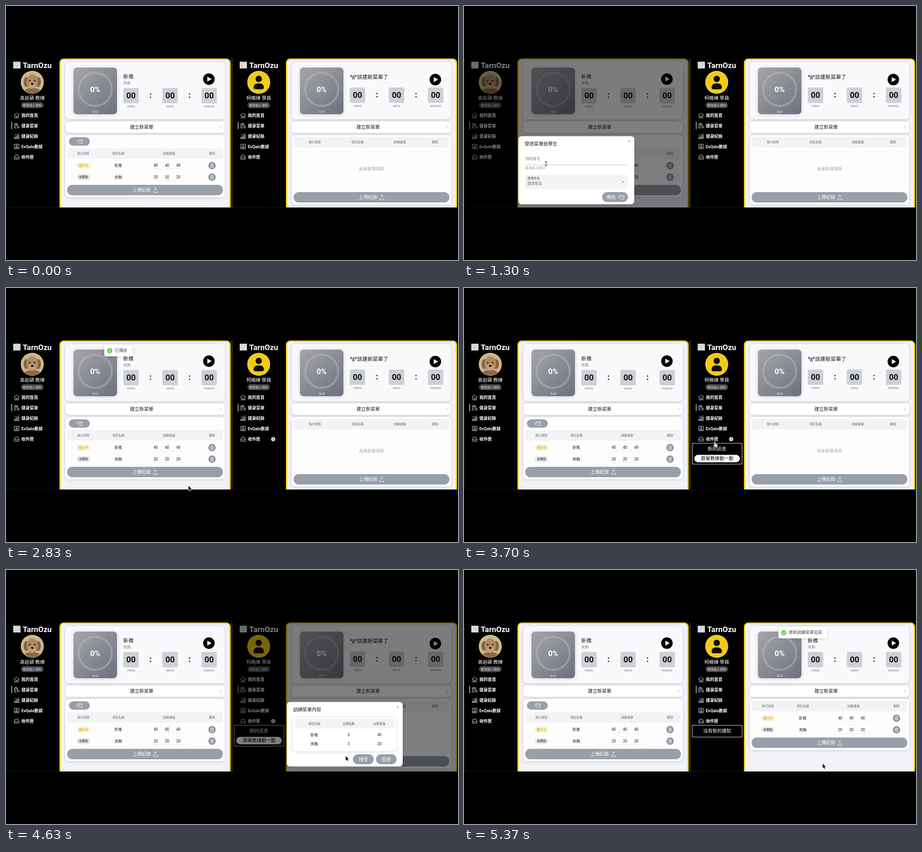
Animation, 998 px wide and 561 px high, one loop 5.41 s. Source, as an HTML page with a canvas:

```html
<!DOCTYPE html>
<html lang="zh-Hant">
<head>
<meta charset="utf-8">
<style>
html, body { margin: 0; width: 100%; height: 100%; overflow: hidden; background: #000 }
canvas { display: block; width: 998px; height: 561px }
</style>
</head>
<body>
<canvas id="stage"></canvas>
<script>
const stage = document.getElementById('stage'), c = stage.getContext('2d');
const dpr = window.devicePixelRatio || 1;
stage.width = 998 * dpr;
stage.height = 561 * dpr;

const LOOP = 5410, FONT = 'Roboto, "Noto Sans CJK TC", "Noto Sans CJK", sans-serif';
const YELLOW = '#f3cd10', SLATE = '#989fa9', MESSAGE = '跟著教練動一動', STUDENT = '柯曉練';
const ICONS = {
  home: 'M0 6L6 1l6 5M2 5v7h3V8h2v4h3V5',
  list: 'M8 6V2H1v9h5M3 1h3M3 4h4M3 6h3M3 8h2M8 7h3v4H8z',
  chart: 'M1 11V8h2v3M5 11V6h2v5M9 11V4h2v7M0 11.5h12M1 5l3-3 3 2 4-4',
  body: 'M1 1h10v10H1zM4.5 4.5a1.5 1.5 0 1 1 3 0a1.5 1.5 0 1 1-3 0M3 9a3 2.4 0 0 1 6 0z',
  inbox: 'M1 7l2-5h6l2 5v4H1zM1 7h3l1 1.5h2L8 7h3',
  mail: 'M3 2h10v8H5M3 2l5 4.500 5-4.500M0 5h4M1 7.500h4',
  upload: 'M0 7v4h9V7M4.500 8V0M1.500 3l3-3 3 3',
  trash: 'M0 1.500h7M2.500 1.500V0h2v1.500M1 1.500V8h5V1.500M2.700 3.500v3M4.300 3.500v3',
  close: 'M0 0l5 5M5 0l-5 5',
  down: 'M0 0l2.500 2.500L5 0',
  left: 'M3 0L0 3l3 3',
  check: 'M0 2l1.700 1.700L5 0'
};
const ARROW = new Path2D('M0 0V9.500L2.200 7.500 3.700 11 5.400 10.300 3.900 7H7z');
const HAND = new Path2D('M-1 0a1 1 0 0 1 2 0V4l4 1q1 .5 .7 2L5 11H0L-3.500 7q0-1.500 1.200-1L-1 7z');

const ramp = (t, a, b) => Math.max(0, Math.min(1, (t - a) / (b - a)));
const pulse = (t, on, off, d = 160) => ramp(t, on, on + d) * (1 - ramp(t, off, off + d));

function text(s, x, y, size, color = '#18181b', align = 'center', weight = 400) {
  c.font = `${weight} ${size}px ${FONT}`;
  c.textAlign = align;
  c.fillStyle = color;
  c.fillText(s, x, y + size * .36);
}

function box(x, y, w, h, r, fill, shadow = 0) {
  c.save();
  if (shadow) {
    c.shadowColor = 'rgba(0,0,0,.16)';
    c.shadowBlur = shadow * dpr;
    c.shadowOffsetY = dpr;
  }
  c.fillStyle = fill;
  c.beginPath();
  c.roundRect(x, y, w, h, r);
  c.fill();
  c.restore();
}

function disc(x, y, rx, fill, ry = rx) {
  c.fillStyle = fill;
  c.beginPath();
  c.ellipse(x, y, rx, ry, 0, 0, 7);
  c.fill();
}

function line(x1, x2, y, color, w = .7) {
  c.fillStyle = color;
  c.fillRect(x1, y, x2 - x1, w);
}

function icon(name, x, y, color = '#fff', w = 1) {
  c.save();
  c.translate(x, y);
  c.strokeStyle = color;
  c.lineWidth = w;
  c.stroke(new Path2D(ICONS[name]));
  c.restore();
}

function button(x, y, w, h, label) {
  box(x, y, w, h, h / 2, SLATE);
  if (label) text(label, x + w / 2, y + h / 2, 10.3, '#fff');
}

function dogPhoto() {
  c.save();
  c.beginPath();
  c.arc(58, 169, 24, 0, 7);
  c.clip();
  c.fillStyle = '#c3b5a0';
  c.fillRect(30, 140, 56, 56);
  disc(58, 193, 21, '#8d6645', 12);
  disc(45, 168, 6, '#87603f', 11);
  disc(71, 168, 6, '#87603f', 11);
  disc(58, 167, 13, '#b18a61', 16);
  disc(58, 175, 8, '#c4a078', 7);
  disc(52.5, 165, 1.8, '#20170f');
  disc(63.5, 165, 1.8, '#20170f');
  disc(58, 172, 3.2, '#20170f', 2.3);
  c.restore();
}

function sidebar(coach) {
  box(16, 123, 16, 15, 0, '#d5d7da');
  text('TarnOzu', 37, 131, 17, '#fff', 'left', 700);
  disc(58, 168.5, 25.3, '#f6d93b');
  if (coach) dogPhoto();
  else {
    disc(58, 168.5, 23.5, '#f2cb12');
    disc(58, 161, 7, '#0b0b0b');
    box(46.5, 171, 23, 13, [10, 10, 5, 5], '#0b0b0b');
  }
  text(coach ? '高岩碩 教練' : STUDENT + ' 學員', 58, 203.5, 10.4, '#fff', 'center', 500);
  box(33, 212.5, 50, 13, 6.5, '#48484b');
  text('修改個人資料', 58, 219, 7, '#eee');
  [['home', '我的首頁'], ['list', '健身菜單'], ['chart', '健身紀錄'], ['body', 'EvQalo數據'], ['inbox', '收件匣']]
    .forEach(([name, label], i) => {
      const y = 241.3 + i * 23;
      icon(name, 17.5, y - 6, '#eee', .9);
      text(label, 34, y, 9.2, '#fff', 'left', 700);
    });
  box(12, 256, 1.2, 16, 0, '#fff');
}

function timerCard(loaded) {
  box(131, 124, 352, 126, 8, '#f9f9fb', 6);
  const g = c.createLinearGradient(149, 136, 245, 239);
  g.addColorStop(0, '#a5a6a9');
  g.addColorStop(1, '#6c717d');
  box(149, 136, 96, 103, 8, g, 9);
  c.strokeStyle = 'rgba(190,193,200,.42)';
  c.lineWidth = 4.5;
  c.beginPath();
  c.arc(197, 184, 36.5, 0, 7);
  c.stroke();
  text('0%', 197, 184, 17, '#fff', 'center', 700);
  text(loaded ? '0/3' : '0/0', 197, 233, 8, '#f2f2f2');
  if (loaded) {
    text('卧推', 259, 156, 11.5, '#18181b', 'left');
    text('夾胸', 259, 170.5, 8, '#85858c', 'left');
  } else {
    line(261, 273, 154, '#50545c', 1.6);
    box(260.5, 151.500, 2, 6, 1, '#50545c');
    box(271.5, 151.500, 2, 6, 1, '#50545c');
    disc(267, 154, 2, '#e9b23f');
    box(264.700, 156, 4.600, 4, 1, '#d64b3b');
    box(264, 159.500, 2, 3, .5, '#3f66a8');
    box(268, 159.500, 2, 3, .5, '#3f66a8');
    text('該建新菜單了', 275, 156.5, 11.5, '#18181b', 'left');
  }
  const dy = loaded ? 0 : -1;
  ['mins', 'secs', 'msecs'].forEach((label, i) => {
    const x = 276 + i * 86.3;
    box(x - 17, 181 + dy, 34, 34, 3, '#cdd0d4');
    text('00', x, 198 + dy, 18, '#111', 'center', 700);
    text(label, x, 221.5 + dy, 8, '#8b8e96', 'center', 500);
    if (i < 2) text(':', x + 43, 197 + dy, 18, '#111', 'center', 700);
  });
  disc(448, 161.5 - dy, 12.7, '#000');
  c.fillStyle = '#fff';
  c.fill(new Path2D(`M444.500 ${156 - dy}v11l9.500-5.500z`));
}

function tableHead(y, xs) {
  box(135, y, 344, 23, 5, '#f3f3f6');
  ['執行狀態', '項目名稱', '訓練重量', '刪除'].forEach((s, i) =>
    text(s, xs[i], y + 11.5, 6.8, '#66666e', 'center', 500));
}

function row(y, name, weight, active) {
  box(156, y - 6.5, 30, 13, 6.5, active ? '#fbefc6' : '#e6e6e9');
  text(active ? '進行中' : '未開始', 171, y, 6.8, active ? '#c79b16' : '#222', 'center', 500);
  text(name, 248, y, 8.2);
  for (let i = 0; i < 3; i++) {
    const x = 330.5 + i * 25;
    text(weight, x, y, 8.2);
    line(x - 5, x + 16, y + 7, '#dedee2');
  }
  disc(455, y, 8.2, '#8f97a1');
  icon('trash', 451.500, y - 4, '#fff', .8);
}

function menuCard(loaded, mail) {
  const y = mail ? 314 : 289, btn = loaded ? y + 81 : 411;
  box(131, 285, 352, btn + 27.5 - 285, 8, '#fdfdfe', 6);
  if (mail) {
    button(139, 290, 46, 18.5);
    icon('mail', 155.500, 293.500, '#fff', .9);
  }
  tableHead(y, loaded ? [171, 248, 360, 455] : [182, 276, 369.5, 447.5]);
  if (loaded) {
    row(y + 38.5, '卧推', 40, true);
    row(y + 64, '夾胸', 20, false);
  } else text('尚未新增項目', 307, 360, 9.2, '#a1a1a8');
  button(135, btn, 344, 23);
  text('上傳紀錄', 299.5, btn + 11.5, 10.3, '#fff');
  icon('upload', 325.500, btn + 6, '#fff', .9);
}

function app(coach, loaded) {
  sidebar(coach);
  box(118, 116, 378, 345, [9, 9, 0, 0], YELLOW);
  box(120.7, 118.5, 372.5, 345, [7, 7, 0, 0], '#f2f2f7');
  timerCard(loaded);
  box(131, 255, 352, 25, 7, '#fff', 6);
  text('建立新菜單', 299.5, 267.5, 10.3, '#18181b', 'center', 500);
  icon('left', 472.500, 264.500, '#9a9aa2', .9);
  menuCard(loaded, coach);
}

function shade(x, w, k) {
  c.fillStyle = `rgba(0,0,0,${.5 * k})`;
  c.fillRect(x, 116, w, 329);
}

function modal(x, y, w, h, k, title, content) {
  if (k <= 0) return;
  const s = 1.03 - .03 * k * k, cx = x + w / 2, cy = y + h / 2;
  c.save();
  c.globalAlpha = k;
  c.translate(cx, cy);
  c.scale(s, s);
  c.translate(-cx, -cy);
  box(x, y, w, h, 7, '#fff', 5);
  text(title, x + 14, y + 16.3, 10.3, '#18181b', 'left');
  icon('close', x + 242.500, y + 8.500, '#71717a', .8);
  content();
  c.restore();
}

function sendForm(t) {
  const focus = ramp(t, 1340, 1420), typed = Math.floor(ramp(t, 1430, 1760) * MESSAGE.length);
  text('你的留言', 136, 337 - 8 * focus, 8 - 1.2 * focus, '#77777f', 'left');
  text(MESSAGE.slice(0, typed), 136, 342, 8.2, '#18181b', 'left');
  line(134, 362, 350.5, '#c4c4ca', 1);
  const reach = 114 * focus * (1 - ramp(t, 1900, 1980));
  line(248 - reach, 248 + reach, 350.3, '#18181b', 1.2);
  text('最多輸入8個字', 136, 358, 6.8, '#9a9aa2', 'left');
  box(134, 372.5, 228, 32, 6, '#f4f4f6');
  text('選擇學員', 140, 380.5, 6.8, '#52525b', 'left');
  const chosen = t > 2130;
  text(chosen ? STUDENT : '選擇學員', 140, 392, 8, chosen ? '#18181b' : '#71717a', 'left');
  icon('down', 348.500, 387, '#333', 1);
  button(305, 411, 57, 22);
  text('傳送', 324.500, 422, 10.3, '#fff');
  icon('mail', 340, 416.500, '#fff', .9);
  const open = pulse(t, 1930, 2130, 70);
  if (open) {
    c.globalAlpha *= open;
    box(134, 408, 228, 30, 6, '#fff', 7);
    box(138, 412, 220, 22, 4, t > 2040 ? '#d4d4d8' : '#fff');
    text(STUDENT, 144, 423, 8, '#18181b', 'left');
  }
}

function planTable() {
  const xs = [680.5, 756.5, 824.5];
  box(633, 324.5, 229, 76, 7, '#fff', 6);
  box(638, 329, 220, 21, 5, '#f3f3f6');
  [['項目名稱', '目標組數', '目標重量'], ['卧推', 3, 40], ['夾胸', 3, 20]].forEach((cells, r) =>
    cells.forEach((s, i) => text(s, xs[i], [339.5, 364, 384.5][r], r ? 8.2 : 6.8, r ? '#18181b' : '#66666e')));
  button(766, 407, 46, 22, '接受');
  button(817, 407, 45.5, 22, '拒絕');
}

function inboxMenu(t) {
  const done = t > 5080;
  if (t > 2660 && !done) {
    disc(590, 333.8, 4.8, '#d4d4d8');
    text('1', 590, 333.8, 6.5, '#111');
  }
  if (t < 3600) return;
  box(503.5, 342.5, 111, done ? 27 : 47, 2, '#e4e4e7');
  box(504.5, 343.5, 109, done ? 25 : 45, 1.5, '#000');
  if (done) text('沒有新的通知', 559, 355.7, 10.3, '#fff', 'center', 500);
  else {
    text('新的訊息', 558.5, 355.7, 10.3, '#fff');
    box(508.5, 368.5, 100.5, 16.5, 8.2, '#fff');
    text(MESSAGE, 559, 376.7, 10.3, '#111', 'center', 500);
  }
}

function toast(x, w, label, k) {
  if (k <= 0) return;
  const y = 125 - 22 * (1 - k) ** 2;
  c.save();
  c.globalAlpha = k;
  box(x, y, w, 26, 4, '#fff', 7);
  disc(x + 12, y + 13.5, 5.7, '#61d345');
  icon('check', x + 9.500, y + 11.700, '#fff', 1.2);
  text(label, x + 23, y + 13, 9.2, '#444', 'left');
  c.restore();
}

// time, x, y of the pointer tip
const PATH = [
  [330, 262, 443], [740, 163, 300], [960, 163, 300], [1240, 181, 348], [1760, 181, 348], [1900, 250, 388],
  [1960, 250, 388], [2080, 190, 423], [2150, 190, 423], [2350, 333, 422], [2470, 333, 422], [2790, 403, 437],
  [2920, 403, 437], [3480, 555, 332], [3640, 555, 332], [3860, 549, 376], [4190, 549, 376],
  [4600, 750, 411], [4660, 750, 411], [4830, 789, 417], [4930, 789, 417], [5200, 792, 428], [LOOP, 792, 428]
];

function pointer(t) {
  if (t < PATH[0][0]) return;
  const i = PATH.findIndex(p => p[0] > t), [a, ax, ay] = PATH[i - 1], [b, bx, by] = PATH[i];
  const u = ramp(t, a, b), e = u * u * (3 - 2 * u);
  const x = ax + (bx - ax) * e, y = ay + (by - ay) * e;
  const over = (l, r, top, bottom) => x > l && x < r && y > top && y < bottom;
  const form = t > 1000 && t < 2500, plan = t > 4200 && t < 4950;
  const hand = form
    ? over(134, 362, 372, 438)
    : plan ? over(766, 862, 407, 429)
      : over(139, 185, 290, 309) || over(517, 600, 325, 341) || (t > 3600 && t < 5000 && over(508, 609, 368, 386));
  c.save();
  c.translate(x, y);
  if (form && over(134, 362, 328, 352)) {
    c.strokeStyle = '#111';
    c.lineWidth = 1;
    c.stroke(new Path2D('M-2-4.500h4M0-4.500v9M-2 4.500h4'));
  } else {
    const shape = hand ? HAND : ARROW;
    c.lineWidth = 1.4;
    c.strokeStyle = hand ? '#000' : '#fff';
    c.fillStyle = hand ? '#fff' : '#000';
    c.stroke(shape);
    c.fill(shape);
  }
  c.restore();
}

function draw(t) {
  c.setTransform(dpr, 0, 0, dpr, 0, 0);
  c.fillStyle = '#000';
  c.fillRect(0, 0, 998, 561);
  const form = pulse(t, 890, 2460), plan = pulse(t, 4045, 4900);

  c.save();
  c.beginPath();
  c.rect(0, 116, 998, 329);
  c.clip();
  app(true, true);
  box(496.5, 116, 4, 329, 0, '#26282c');
  c.save();
  c.translate(500, 0);
  app(false, t > 5050);
  c.restore();
  inboxMenu(t);
  line(0, 118, 444.3, '#0c2b2b');
  line(500, 618, 444.3, '#0c2b2b');
  box(0, 116, 1, 329, 0, '#15263c');
  shade(0, 497, form);
  shade(500, 498, plan);
  modal(120, 287.5, 256, 150.5, form, '發送菜單給學生', () => sendForm(t));
  modal(620, 291.5, 256, 142.5, plan, '訓練菜單內容', planTable);
  toast(217, 62, '已傳送', pulse(t, 2580, 3260));
  toast(694, 108, '更新訓練菜單完成', ramp(t, 5090, 5250));
  c.restore();
  pointer(t);
}

const start = performance.now();
(function frame() {
  draw((performance.now() - start) % LOOP);
  requestAnimationFrame(frame);
})();
</script>
</body>
</html>
```
